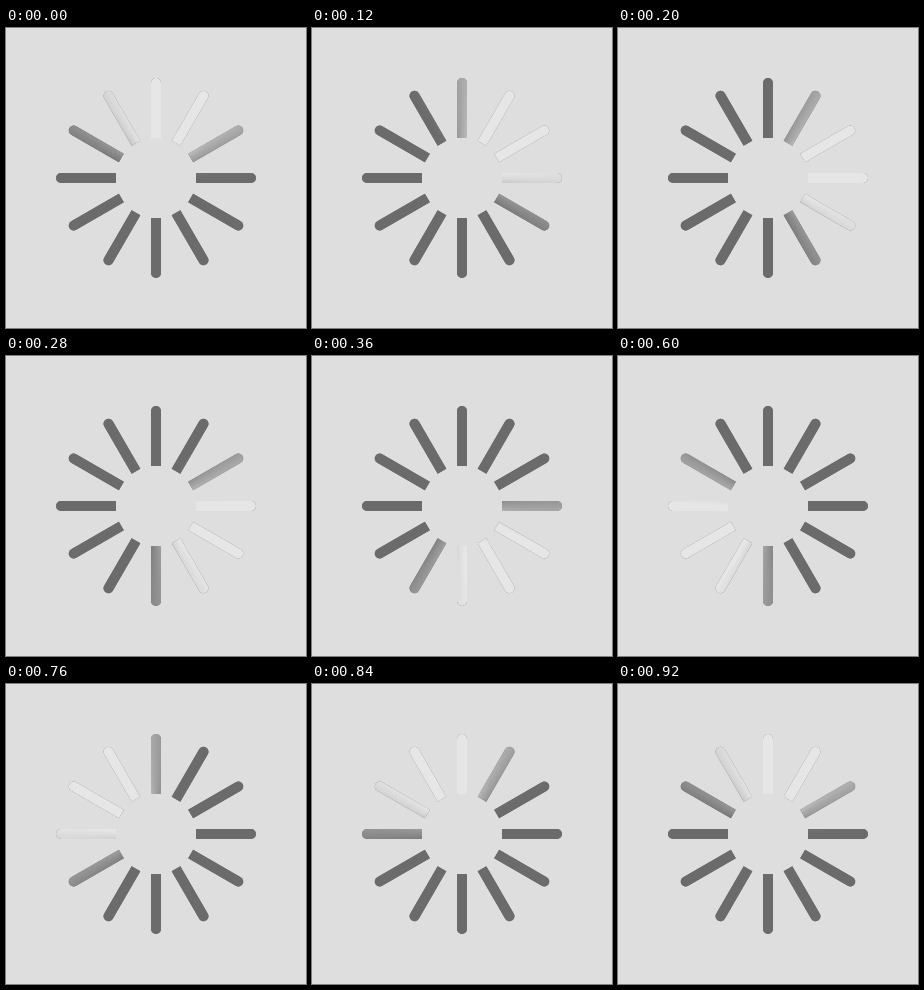
Write an HTML page with a canvas that moves like this. It is 300 px wide and 300 px high and loops after 0.96 s.

```html
<!DOCTYPE html>
<html lang="en">
<head>
<meta charset="utf-8">
<title>Spinner</title>
<style>
  html, body { margin: 0; width: 100%; height: 100%; overflow: hidden; background: #dedede; }
  canvas { display: block; width: 300px; height: 300px; }
</style>
</head>
<body>
<canvas id="stage" width="300" height="300"></canvas>
<script>
const ctx = document.getElementById('stage').getContext('2d');
const STEP = 40, STEPS = 24;
const BASE = 107, GLOW = 230, BACK = '#dedede';
const grey = v => `rgb(${v},${v},${v})`;

// Brightness around the moving highlight: [degrees from its heading, grey level]
const profile = [
  [-180, BASE], [-78, BASE], [-68, 116], [-57, 144], [-47, 168], [-32, 212],
  [-23, GLOW], [36, GLOW], [44, 218], [60, 168], [72, 138], [82, 114], [90, BASE], [180, BASE]
];

// Twelve bars, square at the hub and round at the rim
const bars = new Path2D();
const bar = new Path2D('M-5 -40V-95A5 5 0 0 1 5 -95V-40Z');
for (let i = 0; i < 12; i++) {
  bars.addPath(bar, new DOMMatrix().translate(150, 150).rotate(i * 30));
}

function draw(time) {
  const step = Math.floor(time / STEP) % STEPS;
  const heading = step / (STEPS - 1) * 2 * Math.PI;
  const sweep = ctx.createConicGradient(heading + Math.PI / 2, 150, 150);
  for (const [deg, level] of profile) sweep.addColorStop((deg + 180) / 360, grey(level));

  ctx.fillStyle = BACK;
  ctx.fillRect(0, 0, 300, 300);
  // The dark layer below leaves a fine rim around the lit bars
  ctx.fillStyle = grey(BASE);
  ctx.fill(bars);
  ctx.fillStyle = sweep;
  ctx.fill(bars);
}

const start = performance.now();
function tick() {
  draw(performance.now() - start);
  requestAnimationFrame(tick);
}
tick();
</script>
</body>
</html>
```
